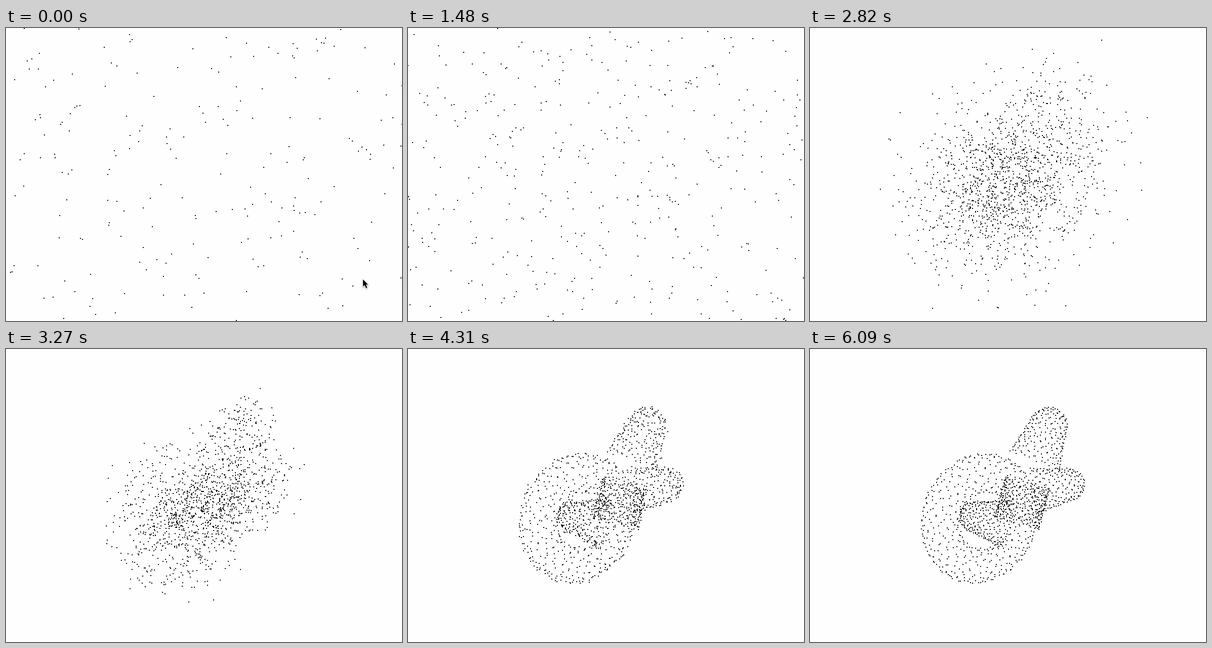
Write an HTML page with a canvas that moves like this. It is 782 px wide and 578 px high and loops after 6190 ms.

```html
<!DOCTYPE html>
<html lang="en">
<head>
<meta charset="utf-8">
<title>Point cloud from noise</title>
<style>
  html, body { margin: 0; width: 100%; height: 100%; overflow: hidden; background: #fefefe; }
  canvas { display: block; }
</style>
</head>
<body>
<canvas id="stage" width="782" height="578"></canvas>
<script>
const ctx = document.getElementById('stage').getContext('2d');
const TAU = Math.PI * 2, GOLDEN = 0.618034;
const CENTER = { x: 395, y: 295 };

// Frame timing: 150 ms each, with a few shorter steps
const shortSteps = { 5: 130, 17: 140, 28: 140, 31: 140, 33: 140, 41: 100 };
const starts = [];
let loop = 0;
for (let i = 0; i < 42; i++) {
  starts.push(loop);
  loop += shortSteps[i] || 150;
}

let seed = 20177;
function random() {
  seed = (seed + 0x6D2B79F5) | 0;
  let h = Math.imul(seed ^ (seed >>> 15), 1 | seed);
  h = (h + Math.imul(h ^ (h >>> 7), 61 | h)) ^ h;
  return ((h ^ (h >>> 14)) >>> 0) / 4294967296;
}

const points = [];
function addPoint(x, y) {
  const radius = Math.sqrt(-2 * Math.log(1 - random()));
  const angle = TAU * random();
  points.push({
    x: x - CENTER.x + random() * 3 - 1.5,
    y: y - CENTER.y + random() * 3 - 1.5,
    nx: radius * Math.cos(angle),
    ny: radius * Math.sin(angle)
  });
}

// Tilted ring, evenly covered by a golden-ratio sequence
function torus(count) {
  const mid = 0.72, thickness = 0.28;
  for (let i = 0; i < count; i++) {
    const u = TAU * i * GOLDEN;
    const phase = TAU * (i + 0.5) / count;
    const v = phase - thickness / mid * Math.sin(phase);
    const rho = mid + thickness * Math.cos(v);
    const c = rho * Math.cos(u), s = rho * Math.sin(u);
    addPoint(335 + 115 * c + (1 - rho) * 18, 334 - 12 * c + 127 * s + (1 - rho) * 8);
  }
}

// Tapered tube seen from the side, optionally with a round cap at its second end
function tube(count, x0, y0, r0, x1, y1, r1, capped) {
  const length = Math.hypot(x1 - x0, y1 - y0);
  const dx = (x1 - x0) / length, dy = (y1 - y0) / length;
  for (let i = 0; i < count; i++) {
    const along = (i + 0.5) / count * (length + (capped ? r1 : 0));
    const z = (along - length) / r1;
    const r = z > 0 ? r1 * Math.sqrt(1 - z * z) : r0 + (r1 - r0) * along / length;
    const across = r * Math.cos(TAU * i * GOLDEN);
    addPoint(x0 + dx * along - dy * across, y0 + dy * along + dx * across);
  }
}

torus(510);
tube(200, 443, 222, 52, 471, 152, 37, true);
tube(180, 440, 280, 45, 510, 268, 32, true);
tube(250, 390, 345, 48, 326, 331, 30, true);
tube(280, 408, 345, 45, 430, 262, 45, false);

function drawCursor(x, y) {
  const arrow = new Path2D('M0 0V14L3.2 11.2 6 17.2 8.4 16.1 5.6 10.3H10Z');
  ctx.save();
  ctx.translate(x, y);
  ctx.shadowColor = 'rgba(0,0,0,.4)';
  ctx.shadowBlur = 3;
  ctx.shadowOffsetY = 1;
  ctx.strokeStyle = '#fff';
  ctx.lineWidth = 2;
  ctx.stroke(arrow);
  ctx.shadowColor = 'transparent';
  ctx.fillStyle = '#000';
  ctx.fill(arrow);
  ctx.restore();
}

function draw(now) {
  const t = now % loop;
  const step = starts.filter(start => start <= t).length - 1;
  const spread = 700 / (1 + Math.exp((step - 12.2) / 3));
  // The shape itself opens out from its centre as the noise fades
  const size = 1 / (1 + (spread / 140) ** 2);

  ctx.fillStyle = '#fefefe';
  ctx.fillRect(0, 0, 782, 578);
  ctx.fillStyle = '#080808';
  for (const p of points) {
    const x = CENTER.x + size * p.x + spread * p.nx;
    const y = CENTER.y + size * p.y + spread * p.ny;
    ctx.fillRect(Math.round(x) - 1, Math.round(y) - 1, 2, 2);
  }
  if (step < 2) drawCursor(705 + 45 * step, 496 + 4 * step);
}

let origin;
function tick(now) {
  origin ??= now;
  draw(now - origin);
  requestAnimationFrame(tick);
}
requestAnimationFrame(tick);
</script>
</body>
</html>
```
